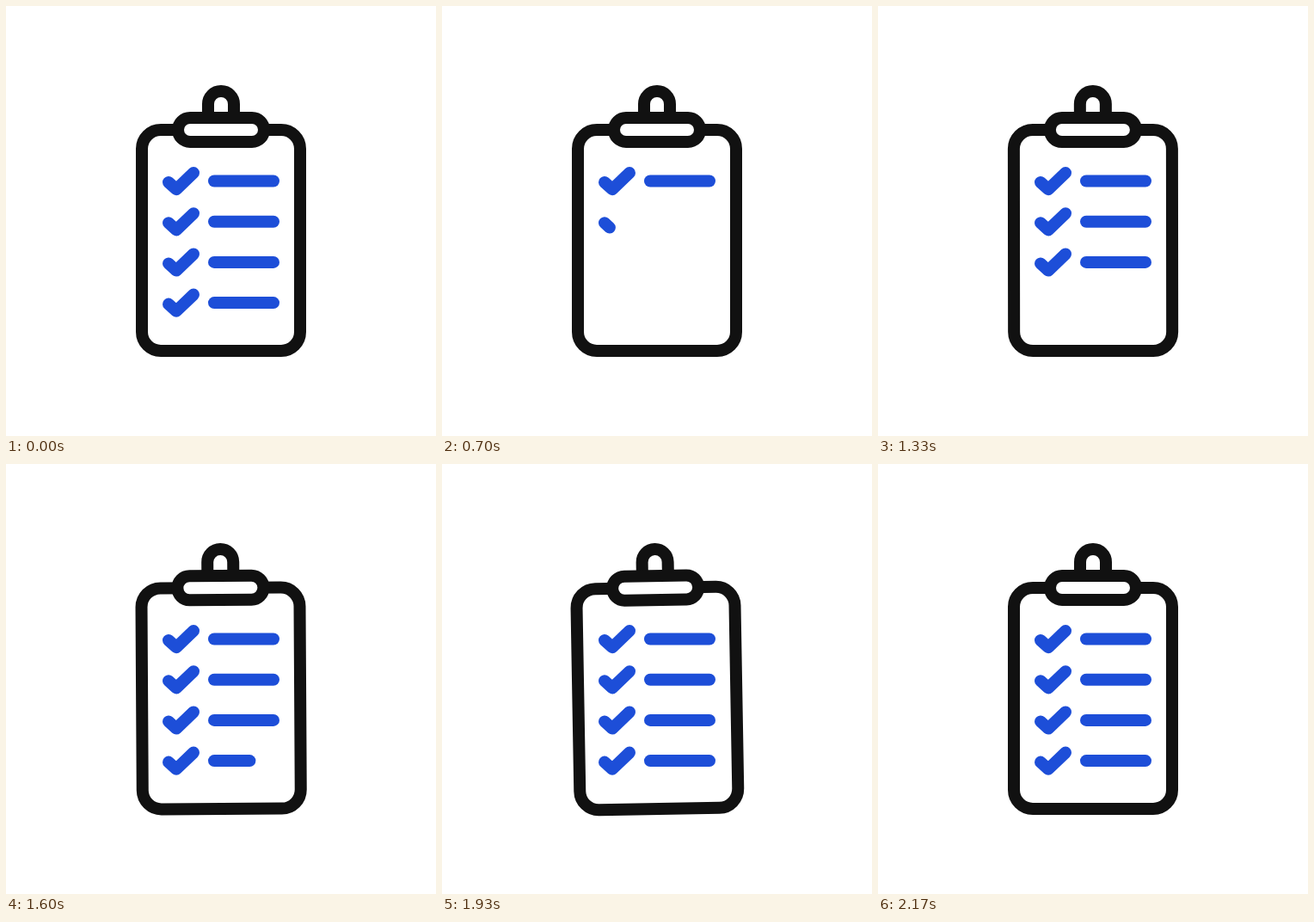
Write an HTML page that moves like this. It is 500x500 px and loops after 2330 ms.

```html
<!DOCTYPE html>
<html lang="en">
<head>
<meta charset="utf-8">
<title>Checklist</title>
<style>
  html, body { margin: 0; width: 100%; height: 100%; overflow: hidden; background: #fff; }
  svg { display: block; width: 100%; height: 100%; }
  path, rect { fill: none; stroke-width: 14; stroke-linecap: round; stroke-linejoin: round; }
  #board { stroke: #111; }
  #board .clip { fill: #fff; }
  #list { stroke: #1d4ed8; }
</style>
</head>
<body>
<svg viewBox="0 0 500 500">
  <g id="board">
    <rect x="158" y="144" width="184" height="257" rx="22"/>
    <path d="M235 130V114a15 15 0 0 1 30 0V130"/>
    <rect class="clip" x="200" y="130" width="100" height="28" rx="14"/>
  </g>
  <g id="list"></g>
</svg>
<script>
const LOOP = 2330, FPS = 30, LAST = 69;
const ROWS = 4, ROW_GAP = 47.2, ROW_FRAMES = 10, STROKE_FRAMES = 5;
const ERASE_START = 8, DRAW_START = 10;
const SWING = [[38, 0], [50, -0.4], [55, 5], [60, -5], [65, 0]];

const board = document.getElementById('board');
const list = document.getElementById('list');
const clamp = v => Math.min(1, Math.max(0, v));

function addStroke(d, row, start) {
  const el = document.createElementNS('http://www.w3.org/2000/svg', 'path');
  el.setAttribute('d', d);
  el.setAttribute('transform', `translate(0 ${row * ROW_GAP})`);
  list.append(el);
  return { el, start, length: el.getTotalLength() };
}

const strokes = [];
for (let row = 0; row < ROWS; row++) {
  const start = DRAW_START + row * ROW_FRAMES;
  strokes.push(
    addStroke('M189 205L198 213.2L218 194', row, start),
    addStroke('M242 203.5H311', row, start + STROKE_FRAMES)
  );
}

// Linear interpolation through [frame, value] pairs
function track(keys, frame) {
  if (frame <= keys[0][0]) return keys[0][1];
  for (let i = 1; i < keys.length; i++) {
    const [f0, v0] = keys[i - 1], [f1, v1] = keys[i];
    if (frame <= f1) return v0 + (v1 - v0) * (frame - f0) / (f1 - f0);
  }
  return keys[keys.length - 1][1];
}

function render(time) {
  const frame = Math.min(LAST, Math.floor((time % LOOP) * FPS / 1000 + 0.11));
  board.setAttribute('transform', `rotate(${track(SWING, frame)} 250 250)`);
  for (const { el, start, length } of strokes) {
    const shown = frame < DRAW_START
      ? 1 - clamp((frame - ERASE_START) / (DRAW_START - ERASE_START))
      : clamp((frame - start) / STROKE_FRAMES);
    el.style.visibility = shown > 0 ? 'visible' : 'hidden';
    el.style.strokeDasharray = shown < 1 ? `${shown * length} ${length * 2}` : 'none';
  }
}

const begin = performance.now();
function tick() {
  render(performance.now() - begin);
  requestAnimationFrame(tick);
}
tick();
</script>
</body>
</html>
```
